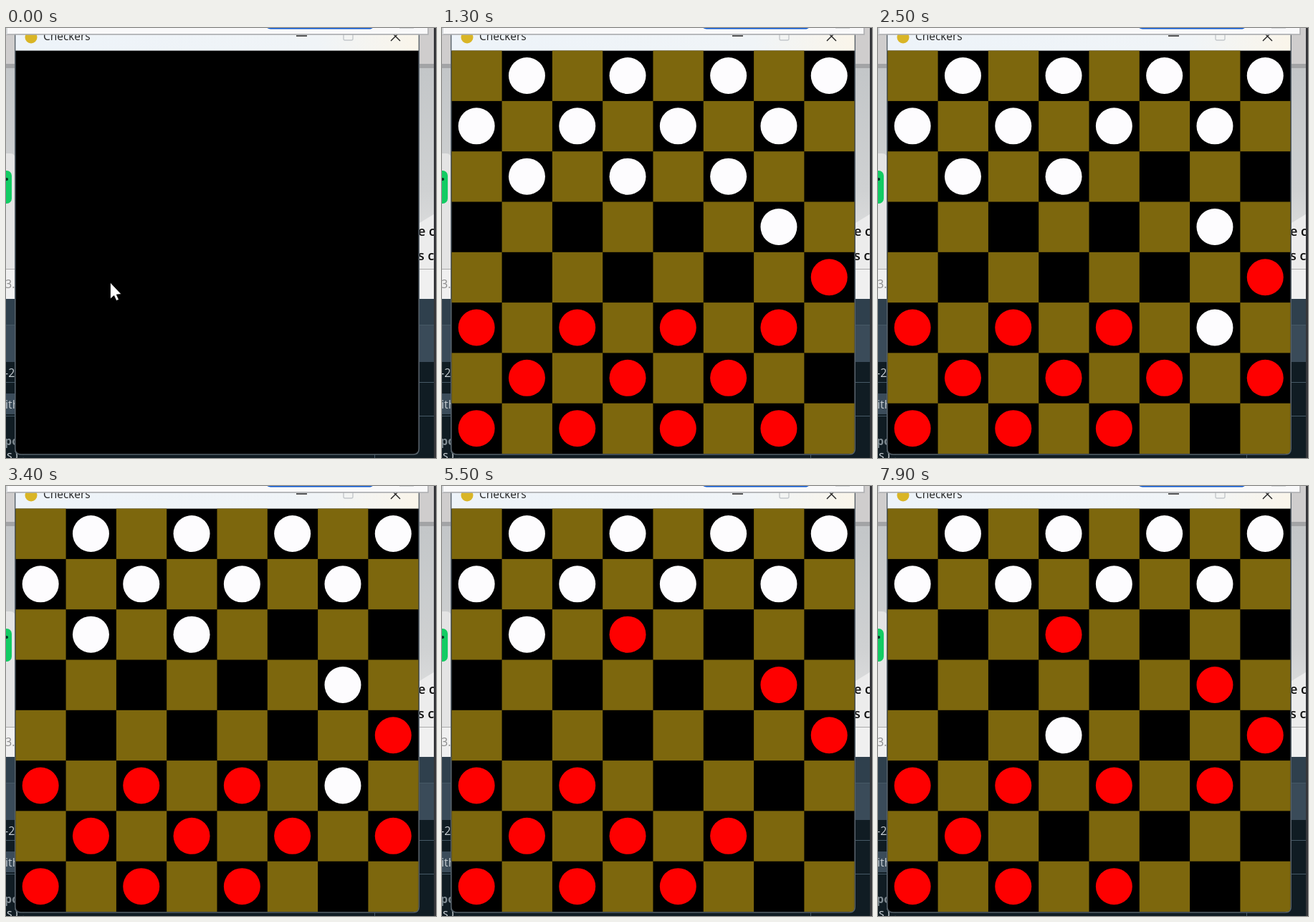
Recreate the animation shown at these times as an HTML page. Size 600 by 600 pixels, loop 8000 ms.

```html
<!DOCTYPE html>
<html lang="en">
<head>
<meta charset="utf-8">
<title>Checkers</title>
<style>
html, body { margin: 0; width: 100%; height: 100%; overflow: hidden; background: #101c23; }
svg { display: block; width: 100vw; height: 100vh; }
text { font-family: "Open Sans", "Noto Sans", sans-serif; }
.mono { font-family: "Noto Sans Mono", monospace; }
</style>
</head>
<body>
<svg viewBox="0 0 600 600">
  <defs>
    <linearGradient id="wall" x1="0" y1="0" x2="0" y2="1">
      <stop offset="0" stop-color="#c3c6c8"/><stop offset=".6" stop-color="#cfd1d2"/><stop offset="1" stop-color="#e6e6e6"/>
    </linearGradient>
    <linearGradient id="bar">
      <stop offset="0" stop-color="#edf3f9"/><stop offset=".75" stop-color="#f0f4f7"/><stop offset="1" stop-color="#faf5ea"/>
    </linearGradient>
    <clipPath id="window"><path d="M13.3 9H575.7V587q0 7.5 -7.5 7.5H20.8q-7.5 0 -7.5 -7.5Z"/></clipPath>
  </defs>

  <!-- Desktop behind the window -->
  <rect width="600" height="50" fill="#cfcdcd"/>
  <rect y="50" width="600" height="6" fill="#a3a4a6"/>
  <rect y="56" width="600" height="281" fill="url(#wall)"/>
  <path d="M0 175H6Q13 175 13 184V336H0Z" fill="#e4e4e4"/>
  <path d="M577 272L600 258V336H577Z" fill="#ececec"/>
  <rect x="-20" y="199" width="28" height="46" rx="7" fill="#12cc63"/>
  <circle cx="1" cy="211" r="2" fill="#032"/>
  <g font-size="18" font-weight="600" fill="#111">
    <text x="575" y="290">e c</text><text x="575" y="324">s c</text>
  </g>
  <path d="M0 336.5H600" stroke="#aaa"/>
  <rect y="337" width="600" height="41" fill="#f0f0f0"/>
  <text x="-1" y="363" font-size="16" fill="#8b8b8b">3.9</text>
  <rect y="378" width="600" height="37" fill="#2f404d"/>
  <rect y="415" width="600" height="51" fill="#3a4b59"/>
  <path d="M0 414.5H600M0 494.5H600M0 541.5H600M514.5 541V600" stroke="#465966"/>
  <rect y="510" width="14" height="29" fill="#3b4c5a"/>
  <g font-size="16" fill="#c5ccd1">
    <text x="-2" y="487">-22</text><text x="-1" y="531">ith</text>
    <text x="-2" y="582" font-weight="700" fill="#7f8a91">po</text>
    <text class="mono" x="0" y="602">s):</text>
  </g>
  <rect x="597" width="3" height="600" fill="#35363a"/>

  <!-- Game window -->
  <path d="M12.8 9H576.2V587q0 8 -8 8H20.8q-8 0 -8 -8Z" fill="#000" stroke="#56616a" stroke-width="1.6"/>
  <g clip-path="url(#window)">
    <rect x="13" y="9" width="563" height="22.6" fill="url(#bar)"/>
    <circle cx="35" cy="13" r="8.5" fill="#d9b526"/>
    <text x="52" y="17" font-size="15.5" fill="#222">Checkers</text>
    <g fill="none" stroke="#222" stroke-width="1.4">
      <path d="M405 11H420M537 5L550 18M550 5L537 18"/>
      <rect x="471" y="4" width="13" height="13" rx="2" stroke="#c4c8cb"/>
    </g>
    <g id="board"></g>
  </g>

  <!-- Browser edge above the window -->
  <path d="M0 0H589V8.5H0Z" fill="#f9f9fa"/>
  <path d="M0 9H589V0" fill="none" stroke="#aeb0b2" stroke-width="1.6"/>
  <path d="M0 0H2V9H0ZM549 0H569V1H549Z" fill="#d5d7d9"/>
  <rect x="361" y="-20" width="154" height="21.5" rx="8" fill="#0b57d0"/>

  <path id="cursor" d="M0 0V23L5.2 18.5L8.5 25.5L12 24L8.8 17L15.5 16.5Z" fill="#fff" stroke="#000" stroke-width=".8"/>
</svg>
<script>
const LOOP = 8000, CELL = 70.3, LEFT = 13.3, TOP = 31.6;
const START = [
  ".w.w.w.w", "w.w.w.w.", ".w.w.w.w", "........",
  ".......r", "r.r.r...", ".r.r.r.r", "r.r.r.r.",
].join("");

// [time, from, to, ...captured], squares written as row and column digits
const MOVES = [
  [700, "27", "36"], [1000, "67", "56"],
  [1500, "25", "34"], [1700, "56", "45"],
  [2100, "34", "56", "45"], [2300, "76", "67"],
  [3500, "36", "45"], [3800, "54", "36", "45"],
  [5000, "23", "34"], [5200, "67", "23", "56", "34"],
  [5800, "21", "32"], [6100, "65", "56"],
  [7500, "32", "43"], [7700, "63", "54"],
];

const board = document.getElementById("board");
const cursor = document.getElementById("cursor");
const index = square => parseInt(square, 8);

function add(tag, attributes) {
  const node = document.createElementNS("http://www.w3.org/2000/svg", tag);
  for (const name in attributes) node.setAttribute(name, attributes[name]);
  return board.appendChild(node);
}

const pieces = [...START].map((_, i) => {
  const row = i >> 3, col = i & 7;
  const x = LEFT + col * CELL, y = TOP + row * CELL;
  if ((row + col) % 2 === 0) add("rect", { x, y, width: CELL, height: CELL, fill: "#7d670d" });
  return add("circle", { cx: x + CELL / 2 - .3, cy: y + CELL / 2 - .2, r: 25.5 });
});

function position(time) {
  const state = [...START];
  for (const [at, from, to, ...captured] of MOVES) {
    if (at > time) break;
    state[index(to)] = state[index(from)];
    for (const square of [from, ...captured]) state[index(square)] = ".";
  }
  return state;
}

const origin = performance.now();

function draw() {
  const time = (performance.now() - origin) % LOOP;
  const blank = time < 100;
  board.style.display = blank ? "none" : "";
  cursor.style.display = time < 200 ? "" : "none";
  cursor.setAttribute("transform", blank ? "translate(145.5 355)" : "translate(269 299)");
  position(time).forEach((piece, i) => {
    pieces[i].setAttribute("fill", { w: "#fdfcfe", r: "#fe0000", ".": "none" }[piece]);
  });
  requestAnimationFrame(draw);
}
draw();
</script>
</body>
</html>
```
